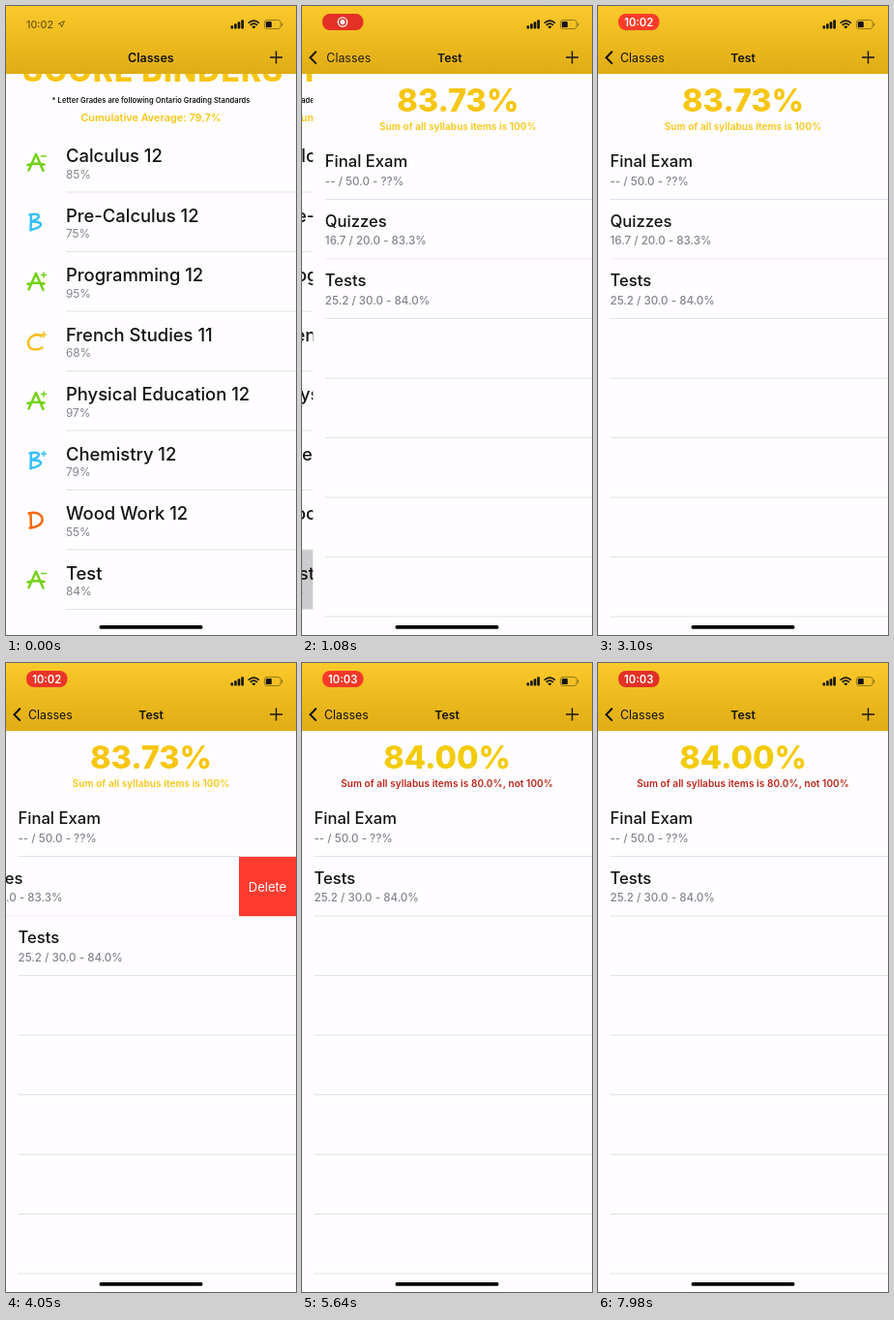
Animation of 300 by 649 pixels, one loop 8000 ms. Source, as an HTML page with a canvas:

```html
<!DOCTYPE html>
<html lang="en">
<head>
<meta charset="utf-8">
<title>Grades</title>
<style>
html, body { margin: 0; width: 100%; height: 100%; overflow: hidden; background: #fffdff; }
canvas { display: block; width: 300px; height: 649px; }
</style>
</head>
<body>
<canvas></canvas>
<script>
const W = 300, H = 649, LOOP = 8000, ROW = 61.5;
const PUSH = 850, DELETE = 4450;
const YELLOW = '#f7c612', INK = '#141313', GREY = '#858389', LINE = '#e4e2e6';

const canvas = document.querySelector('canvas');
const ctx = canvas.getContext('2d');
const scale = window.devicePixelRatio || 1;
canvas.width = W * scale;
canvas.height = H * scale;

const GRADE = {
  A: { color: '#73d216', path: 'M2 18L9.5 1.5L17 18.5M1 12.5Q9 10.5 18 12' },
  B: { color: '#37c0f8', path: 'M4.5 2L4 18.5M3 2.5C13 0 17 5 5 9.5C17 9 19 15 4 18' },
  C: { color: '#f6bd18', path: 'M15 4.5C10 1 2 5 1.5 11.5C1.5 19 9 20 16 16.5' },
  D: { color: '#f6690c', path: 'M4 3L4.5 18M2 3C12 0 17 6 16 11Q14 17 3 18' }
};
const SIGN = { '+': 'M15 3H20M17.5 .5V5.5', '-': 'M15 3.5H20' };
const CLASSES = [
  ['A-', 'Calculus 12', 85], ['B', 'Pre-Calculus 12', 75],
  ['A+', 'Programming 12', 95], ['C+', 'French Studies 11', 68],
  ['A+', 'Physical Education 12', 97], ['B+', 'Chemistry 12', 79],
  ['D', 'Wood Work 12', 55], ['A-', 'Test', 84]
];

const clamp = v => Math.min(1, Math.max(0, v));
const ramp = (t, start, length) => clamp((t - start) / length);
const smooth = u => u * u * (3 - 2 * u);
const mix = (a, b, u) => a + (b - a) * u;

function text(str, x, y, size, weight, color, align = 'left', spacing = 0) {
  ctx.font = `${weight} ${size}px Inter, sans-serif`;
  ctx.letterSpacing = spacing + 'px';
  ctx.textAlign = align;
  ctx.fillStyle = color;
  ctx.fillText(str, x, y);
}

function box(x, y, w, h, color, r = 0) {
  ctx.fillStyle = color;
  ctx.beginPath();
  ctx.roundRect(x, y, w, h, r);
  ctx.fill();
}

function stroke(path, color, width) {
  ctx.strokeStyle = color;
  ctx.lineWidth = width;
  ctx.stroke(new Path2D(path));
}

function layer(dx, dy, alpha, draw) {
  if (alpha <= 0) return;
  ctx.save();
  ctx.translate(dx, dy);
  ctx.globalAlpha *= alpha;
  draw();
  ctx.restore();
}

function drawClassList(pressed) {
  ctx.lineCap = ctx.lineJoin = 'round';
  text('SCORE BINDERS', 17, 78, 32, 800, YELLOW, 'left', 1);
  text('* Letter Grades are following Ontario Grading Standards', 150, 99.5, 7.5, 600, INK, 'center', 0.05);
  text('Cumulative Average: 79.7%', 150, 119, 10.9, 600, YELLOW, 'center');
  if (pressed) box(0, 561, W, ROW, '#cccbce');
  CLASSES.forEach(([grade, name, percent], i) => layer(0, i * ROW, 1, () => {
    const { color, path } = GRADE[grade[0]];
    layer(21.5, 151.5, 1, () => {
      stroke(path, color, 2.5);
      if (grade[1]) stroke(SIGN[grade[1]], color, 1.5);
    });
    text(name, 62, 161, 18.4, 500, INK);
    text(percent + '%', 62, 177.5, 11.8, 400, GREY);
    box(62, 191.5, 238, 1, LINE);
  }));
}

function drawItem(name, detail, y) {
  text(name, 12.5, y + 26, 16.6, 500, INK);
  text(detail, 12.5, y + 44.7, 11.6, 500, GREY);
}

function drawSyllabus(t) {
  const removed = t >= DELETE;
  const gone = smooth(ramp(t, DELETE, 330));
  const gap = ROW * (1 - gone);
  const swipe = -59 * smooth(ramp(t, 3450, 380));

  box(0, 70, W, H, '#fffdff');
  text(removed ? '84.00%' : '83.73%', 150, 109, 32.5, 800, removed ? '#f3cb05' : YELLOW, 'center');
  if (removed) text('Sum of all syllabus items is 80.0%, not 100%', 150, 127.5, 10, 600, '#b92318', 'center', 0.08);
  else text('Sum of all syllabus items is 100%', 150, 127.5, 10, 600, YELLOW, 'center', 0.08);

  drawItem('Final Exam', '-- / 50.0 - ??%', 140);
  box(12.5, 199, 288, 1, LINE);

  layer(0, 0, 1 - gone / 0.75, () => {
    ctx.beginPath();
    ctx.rect(0, 200, W, gap);
    ctx.clip();
    box(W + swipe, 200, -swipe, ROW, '#ff3b30');
    layer(swipe, 0, 1, () => {
      drawItem('Quizzes', '16.7 / 20.0 - 83.3%', 140 + ROW);
      text('Delete', W + 29.5, 235.5, 13, 400, '#fff', 'center');
    });
    box(12.5 + swipe, 199 + gap, 288, 1, LINE);
  });

  drawItem('Tests', '25.2 / 30.0 - 84.0%', 140 + ROW + gap);
  for (let i = 1; i < 8; i++) box(12.5, 199 + ROW * i + gap, 288, 1, LINE);
}

function drawStatus(t) {
  const pill = smooth(ramp(t, 350, 250));
  const clock = smooth(ramp(t, 2450, 250));
  const time = t < 4150 ? '10:02' : '10:03';

  layer(0, 0, 1 - pill, () => {
    text(time, 21, 23, 10.7, 500, '#6b520c');
    stroke('M54 18.5L60.5 15.5L57.5 22L57 19Z', '#6b520c', 0.9);
  });
  layer(0, 0, pill, () => {
    const dark = (1 + Math.cos((t - 6590) / 1400 * 2 * Math.PI)) / 2;
    box(21, 8, 42.5, 17, `rgb(${mix(255, 227, dark)}, ${mix(60, 49, dark)}, ${mix(42, 38, dark)})`, 8);
    layer(42, 16.5, 1 - clock, () => {
      ctx.strokeStyle = '#fff';
      ctx.lineWidth = 1.3;
      ctx.beginPath();
      ctx.arc(0, 0, 4.7, 0, 7);
      ctx.stroke();
      box(-2.5, -2.5, 5, 5, '#fff', 2.5);
    });
    layer(0, 0, clock, () => text(time, 42.2, 20.6, 11.2, 600, '#fff', 'center'));
  });

  for (let i = 0; i < 4; i++) {
    const h = 3.2 + i * 2;
    box(232.5 + i * 3.6, 23.5 - h, 2.6, h, INK, 0.7);
  }
  ctx.lineCap = 'butt';
  stroke('M250.7 17.6Q256.3 12.5 261.9 17.6M252.7 19.8Q256.3 16.5 259.9 19.8', INK, 1.7);
  ctx.fillStyle = INK;
  ctx.fill(new Path2D('M254.2 21.3Q256.3 19.7 258.4 21.3L256.3 23.6Z'));
  ctx.strokeStyle = '#88701f';
  ctx.lineWidth = 0.9;
  ctx.beginPath();
  ctx.roundRect(267.4, 14.5, 16.8, 9, 2.6);
  ctx.stroke();
  box(268.8, 15.9, 6, 6.2, INK, 1.2);
  box(285, 17.4, 1.2, 3.2, '#88701f', 0.6);
}

function drawHeader(t, push) {
  const fill = ctx.createLinearGradient(0, 0, 0, 70);
  fill.addColorStop(0, '#fbc92b');
  fill.addColorStop(1, '#dfac14');
  box(0, 0, W, 70, fill);
  drawStatus(t);
  ctx.lineCap = 'butt';
  stroke('M273 53H286M279.5 46.5V59.5', INK, 1.4);

  layer(mix(126, 23, push), 57.7, 1 - push * 1.5, () => text('Classes', 0, 0, 12.5, 600, INK));
  layer(mix(85, 23, push), 57.7, push * 2 - 1, () => text('Classes', 0, 0, 12.4, 400, INK));
  layer(mix(225, 150, push), 57.7, push * 1.5 - 0.4, () => text('Test', 0, 0, 12.3, 600, INK, 'center'));
  layer(0, 0, push, () => {
    ctx.lineJoin = 'miter';
    stroke('M14.8 46.8L8.5 53.2L14.8 59.6', INK, 2);
  });
}

// Critically damped spring: 0 before the push, settling at 1.
function pushAmount(t) {
  const u = Math.max(0, t - PUSH) * 0.022;
  return u > 9 ? 1 : 1 - (1 + u) * Math.exp(-u);
}

function frame(now) {
  const t = now % LOOP;
  const push = pushAmount(t);
  ctx.setTransform(scale, 0, 0, scale, 0, 0);
  box(0, 0, W, H, '#fffdff');
  if (push < 1) layer(-90 * push, 0, 1, () => drawClassList(t >= PUSH - 20));
  if (push > 0) layer(W * (1 - push), 0, 1, () => drawSyllabus(t));
  drawHeader(t, push);
  box(96.5, 639, 107, 3.8, '#050505', 1.9);
  requestAnimationFrame(frame);
}
requestAnimationFrame(frame);
</script>
</body>
</html>
```
